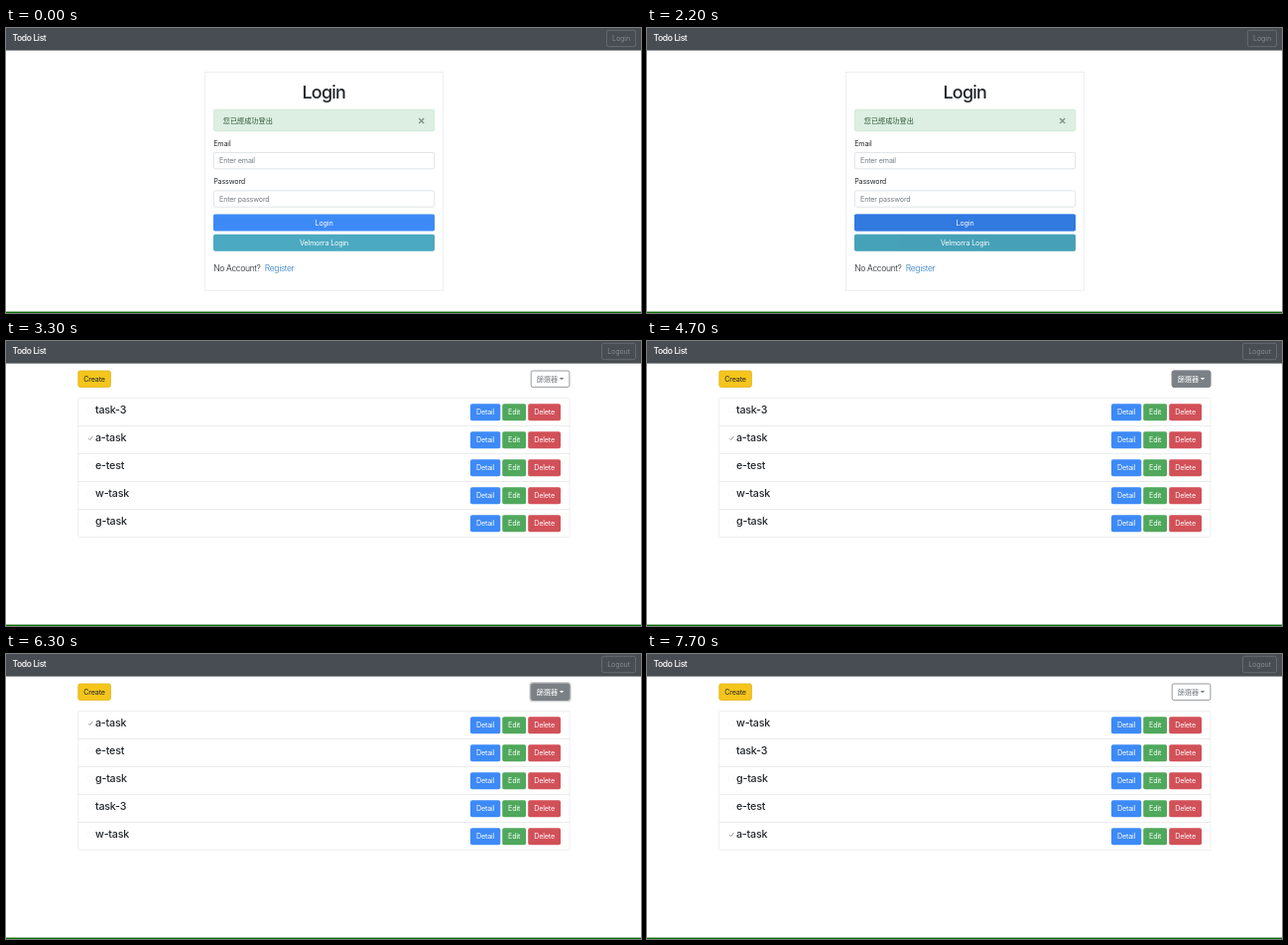
These frames come from a looping animation (640x287 px, 8000 ms). An HTML page:

```html
<!DOCTYPE html>
<html lang="en">
<head>
<meta charset="utf-8">
<title>Todo List</title>
<style>
  html, body { margin: 0; width: 100%; height: 100%; overflow: hidden; background: #fff; }
  svg { display: block; width: 100%; height: 100%; }
  text { font: 400 7.15px Inter, "Noto Sans CJK TC", "Noto Sans CJK", sans-serif; letter-spacing: -.02em; fill: #212529; }
  .mid { text-anchor: middle; }
  .white { fill: #fff; }
  .brand { font-size: 8.6px; font-weight: 500; letter-spacing: -.045em; fill: #fff; }
  .title { font-size: 17.9px; font-weight: 500; letter-spacing: -.04em; }
  .lead { font-size: 8.6px; font-weight: 300; letter-spacing: -.045em; }
  .task { font-size: 10.7px; font-weight: 500; }
  .hint { fill: #74797e; }
  .nav { fill: #85898d; }
  .cjk { letter-spacing: 0; }
</style>
</head>
<body>
<svg id="stage" viewBox="0 0 640 287" preserveAspectRatio="none"></svg>
<script>
const LOOP = 8000;

const rect = (x, y, w, h, fill, more = '') =>
  `<rect x="${x}" y="${y}" width="${w}" height="${h}" fill="${fill}" ${more}/>`;
const text = (x, y, label, cls = '', more = '') =>
  `<text x="${x}" y="${y}" class="${cls}" ${more}>${label}</text>`;
const group = (id, body, more = '') => `<g id="${id}" ${more}>${body}</g>`;
const outline = (x, y, w, h, color, fill = 'none', r = 1.8) =>
  rect(x, y, w, h, fill, `rx="${r}" stroke="${color}" stroke-width=".8"`);
const button = (x, y, w, label, fill, cls = 'white') =>
  rect(x, y, w, 17, fill, 'rx="1.8"') + text(x + w / 2, y + 11.1, label, 'mid ' + cls);
const ring = (x, y, w, color) =>
  rect(x - .8, y - .8, w + 1.6, 18.6, 'none', `rx="2.6" stroke="${color}" stroke-width="1.7"`);
const field = (y, label, hint) =>
  text(209.2, y - 6, label) + outline(209.4, y + .4, 222.3, 16.4, '#d9dde1', '#fff') +
  text(215, y + 11.2, hint, 'hint');

const loginView =
  outline(605.4, 2.3, 29.2, 16.4, '#6f7378') + text(620, 13, 'Login', 'mid nav') +
  outline(200.5, 44.5, 240, 220, '#ebebeb', '#fff', 0) +
  text(320.3, 70.7, 'Login', 'mid title') +
  outline(209.4, 82.2, 222.3, 21.6, '#c9e5d0', '#dcefe2') +
  text(218.8, 95.8, '您已經成功登出', 'cjk', 'style="fill:#31593b"') +
  '<path d="M416.2 91l5 5m0-5l-5 5" stroke="#7b8d80" stroke-width="1.2"/>' +
  field(125, 'Email', 'Enter email') +
  field(163.4, 'Password', 'Enter password') +
  button(209, 187.5, 223, 'Login', '#3d8af7') +
  group('loginHover', button(209, 187.5, 223, 'Login', '#2f73d8')) +
  group('socialRing', ring(209, 207.8, 223, '#a4d5df')) +
  button(209, 207.8, 223, 'Velmorra Login', '#4ba9c1') +
  group('socialHover', button(209, 207.8, 223, 'Velmorra Login', '#3b8da1')) +
  text(209.2, 245, 'No Account?', 'lead') +
  text(260.8, 245, 'Register', 'lead', 'style="fill:#2f7ac0"');

const tasks = ['task-3', 'a-task', 'e-test', 'w-task', 'g-task'];
const ascending = [...tasks].sort();
const descending = [...ascending].reverse();

const taskRow = name => group(name,
  (name === 'a-task'
    ? '<path d="M83.3 12.6l1.4 1.4 2.7-3.5" fill="none" stroke="#777" stroke-width=".8"/>'
    : rect(82.5, 9.5, 5, 5, 'none', 'rx="1" stroke="#f6f6f6" stroke-width=".6"')) +
  text(90, 15.8, name, 'task'));
const rowButtons = y =>
  button(468, y, 30.3, 'Detail', '#3d8af7') +
  button(500.2, y, 23.9, 'Edit', '#4fa85c') +
  button(526.2, y, 32.8, 'Delete', '#d25058');

const filterFace = (fill, ink) =>
  outline(529.2, 30, 38.7, 16.4, '#7d8287', fill) +
  text(534.8, 41, '篩選器', 'cjk', `style="fill:${ink}"`) +
  `<path d="M557.8 37h4.4l-2.2 2.3z" fill="${ink}"/>`;
const menuItem = (id, y, label) =>
  group(id, rect(529.6, y, 70.4, 14, '#f3f4f5')) + text(540, y + 9.6, label);

const listView =
  outline(600.5, 2.3, 34, 16.4, '#6f7378') + text(617.5, 13, 'Logout', 'mid nav') +
  outline(72.8, 30, 32.6, 16.4, '#dfb11c', '#f5c51c') + text(89.1, 41, 'Create', 'mid') +
  group('filterRing', ring(529, 29.7, 39, '#cfd1d4')) +
  filterFace('#fff', '#777c81') +
  group('filterHover', filterFace('#7b8086', '#fff')) +
  outline(72.5, 57.5, 495.5, 140, '#ececec', '#fff', 1) +
  tasks.map((_, i) =>
    (i ? rect(72.5, 57 + 28 * i, 495.5, 1, '#ececec') : '') + rowButtons(63.2 + 28 * i)).join('') +
  tasks.map(taskRow).join('') +
  group('menu',
    outline(529.2, 47.6, 71, 36, '#e6e6e6', '#fff') +
    menuItem('itemAZ', 51.6, 'A→Z') + menuItem('itemZA', 65.8, 'Z→A'));

document.getElementById('stage').innerHTML =
  rect(0, 0, 640, 287, '#fff') +
  rect(0, 0, 640, 22.6, '#484d53') +
  text(6.4, 13.2, 'Todo List', 'brand') +
  group('login', loginView) + group('list', listView) +
  rect(0, 285.6, 640, 1.4, '#0a6a0a');

const $ = id => document.getElementById(id);
const ramp = (t, from, length = 150) => {
  const k = Math.min(1, Math.max(0, (t - from) / length));
  return k * k * (3 - 2 * k);
};
const within = (t, from, to) => t >= from && t < to;
const show = (id, on) => $(id).setAttribute('display', on ? 'inline' : 'none');
const fade = (id, amount) => $(id).setAttribute('opacity', amount);

const SUBMIT = 3300, SORT_UP = 6000, SORT_DOWN = 7000;

function draw(t) {
  show('login', t < SUBMIT);
  show('list', t >= SUBMIT);

  fade('loginHover', ramp(t, 1850) - ramp(t, 2150));
  fade('socialHover', ramp(t, 2150));
  fade('socialRing', ramp(t, 2450));

  // Each sort reloads the page, which resets the filter button.
  const first = t < SORT_UP, second = within(t, SORT_UP, SORT_DOWN);
  fade('filterHover', first ? ramp(t, 4450) : second ? ramp(t, 6080) : 0);
  fade('filterRing', first ? ramp(t, 5150) : second ? ramp(t, 6150) : 0);
  show('menu', within(t, 5500, SORT_UP) || within(t, 6450, SORT_DOWN));
  show('itemAZ', within(t, 5700, SORT_UP) || within(t, 6600, 6750));
  show('itemZA', within(t, 6750, SORT_DOWN));

  const order = first ? tasks : second ? ascending : descending;
  order.forEach((name, i) => $(name).setAttribute('transform', `translate(0 ${57.5 + 28 * i})`));
}

const start = performance.now();
function tick() {
  draw((performance.now() - start) % LOOP);
  requestAnimationFrame(tick);
}
tick();
</script>
</body>
</html>
```
